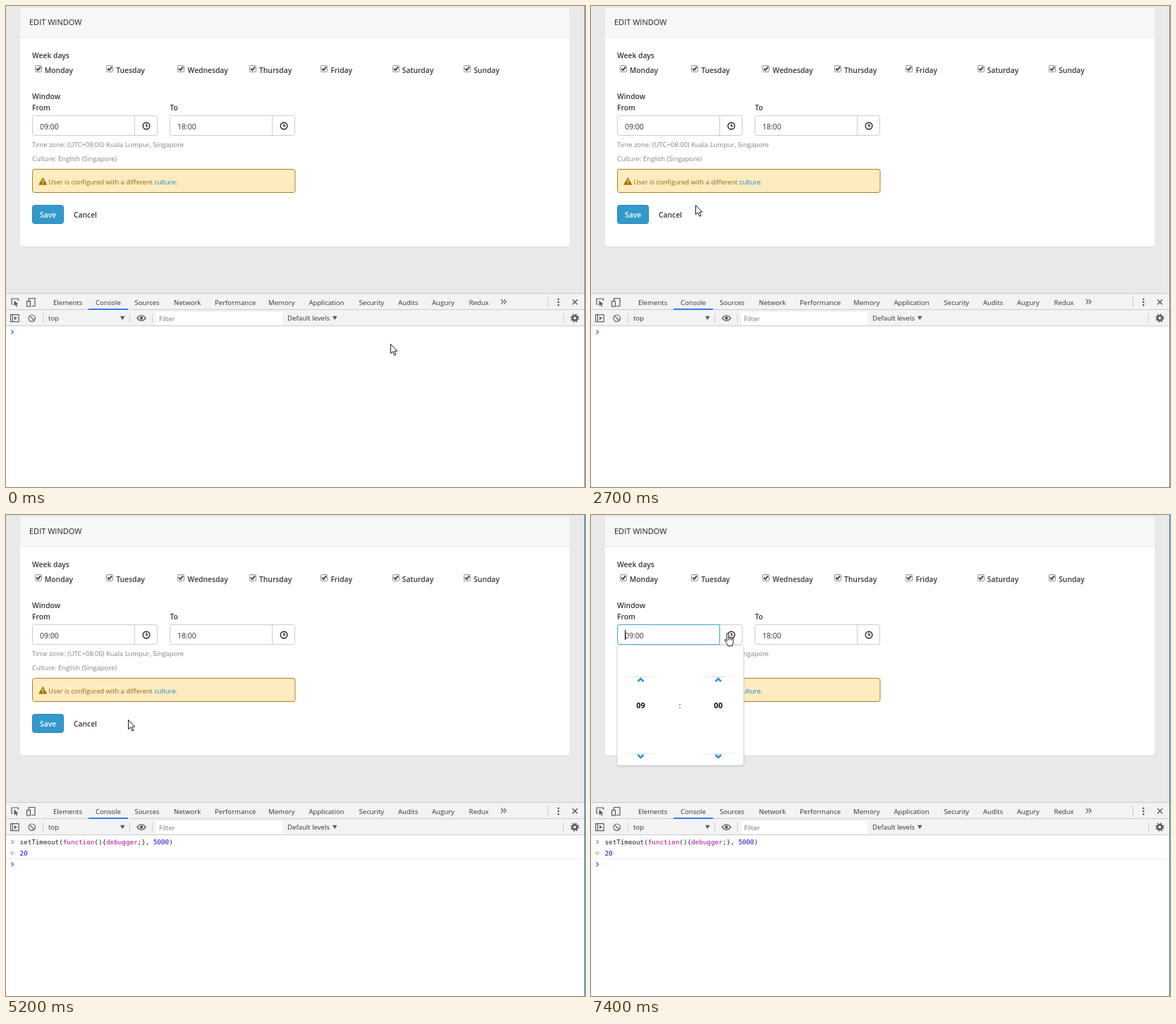
Write an HTML page that moves like this. It is 821 by 682 pixels and loops after 8 s.

```html
<!DOCTYPE html>
<html lang="en">
<head>
<meta charset="utf-8">
<title>Edit window</title>
<style>
  html, body { margin: 0; width: 100%; height: 100%; overflow: hidden; background: #fff; }
  svg { display: block; width: 100vw; height: 100vh; }
  text { font: 9.6px "Open Sans", "Noto Sans", sans-serif; fill: #333; white-space: pre; }
  .head { font-size: 11px; fill: #222; }
  .label { font-size: 10.3px; font-weight: 600; fill: #363636; }
  .value { font-size: 10.5px; }
  .hint { font-size: 9.4px; fill: #7c848b; }
  .warn { font-size: 9.35px; fill: #93690c; }
  .link { fill: #1f87c0; }
  .digits { font-size: 10.9px; font-weight: 700; fill: #111; text-anchor: middle; }
  .code, .code tspan { font: 9.25px "DejaVu Sans Mono", "Noto Sans Mono", monospace; fill: #222; }
  .code .key { fill: #aa0d91; }
  .code .num, .num.code { fill: #1c00cf; }
  .line { fill: none; stroke: #5a5a5a; stroke-width: 1.2; }
  .field { fill: #fff; stroke: #ccc; }
  .sep { stroke: #ccc; }
  .cursor { fill: #fff; stroke: #000; stroke-width: .9; stroke-linejoin: round; }
</style>
</head>
<body>
<svg viewBox="0 0 821 682" xmlns="http://www.w3.org/2000/svg">
  <defs>
    <filter id="soft" x="-10%" y="-10%" width="120%" height="125%">
      <feDropShadow dx="0" dy="1" stdDeviation="1" flood-opacity=".18"/>
    </filter>
    <linearGradient id="fade">
      <stop stop-color="#ddd" stop-opacity=".2"/>
      <stop offset=".5" stop-color="#d4d4d4"/>
      <stop offset="1" stop-color="#ddd" stop-opacity=".2"/>
    </linearGradient>
    <g id="clock" fill="none" stroke="#222" stroke-width="1.4">
      <circle r="4.8"/><path d="M0-3V.4H2.4"/>
    </g>
    <g id="tick">
      <rect x=".5" y=".5" width="9" height="9" rx="1" fill="#f1f1f1" stroke="#949494"/>
      <path d="M2.2 4.9L4.2 7L8 2.4" fill="none" stroke="#333" stroke-width="1.7"/>
    </g>
    <path id="prompt" d="M0 0L3 2.7L0 5.4" fill="none" stroke-width="1.4"/>
  </defs>

  <rect width="821" height="407" fill="#e9e9e9"/>
  <rect x="20" y="4" width="779" height="338" rx="3.5" fill="#d9d9d9"/>
  <rect x="20" y="3" width="779" height="338" rx="3.5" fill="#fff"/>
  <path d="M20 44V6.5a3.5 3.5 0 0 1 3.5-3.5H795.5a3.5 3.5 0 0 1 3.5 3.5V44z" fill="#f7f7f7"/>
  <path d="M20 44.5H799" stroke="#e6e6e6"/>
  <text class="head" x="33" y="27">EDIT WINDOW</text>
  <text class="label" x="37" y="73.5">Week days</text>
  <g id="days"></g>
  <text class="label" x="37" y="132">Window</text>
  <text class="label" x="37" y="147.5">From</text>
  <text class="label" x="232.5" y="147.5">To</text>
  <g id="fields"></g>
  <text class="hint" x="37" y="200">Time zone: (UTC+08:00) Kuala Lumpur, Singapore</text>
  <text class="hint" x="37" y="219.5">Culture: English (Singapore)</text>
  <rect x="37.5" y="231.5" width="372.500" height="33" rx="3" fill="#feebc0" stroke="#a88022"/>
  <path d="M52.2 244L57.3 253H47.1z" fill="#a57400" stroke="#a57400" stroke-width="1.3" stroke-linejoin="round"/>
  <path d="M52.2 246.4V250M52.2 251.2V252.6" stroke="#feebc0" stroke-width="1.4"/>
  <text class="warn" x="60.3" y="252.5">User is configured with a different <tspan class="link">culture.</tspan></text>
  <rect x="37.5" y="282.5" width="44" height="26" rx="3" fill="#3299cb" stroke="#2a86b4"/>
  <text class="label" x="48" y="299.5" style="fill:#fff">Save</text>
  <text class="label" x="96" y="299.5">Cancel</text>

  <g id="popup">
    <rect x="37" y="185" width="179.5" height="170" rx="3" fill="#fff" stroke="#d2d2d2" stroke-width=".7" filter="url(#soft)"/>
    <path d="M44.5 185.5L50 181.5L55.5 185.5z" fill="#fff"/>
    <g id="spinners"></g>
    <text class="digits" x="126" y="273.5" style="font-weight:400">:</text>
  </g>
  <path id="focus" d="M182.5 155.5H40.5a3 3 0 0 0-3 3V180.5a3 3 0 0 0 3 3H182.5z" fill="none" stroke="#3fa3d6"/>
  <path id="fieldCaret" d="M48.5 163V177" stroke="#000"/>

  <rect y="407" width="821" height="47" fill="#f3f3f3"/>
  <rect y="454" width="821" height="228" fill="#fff"/>
  <path class="sep" d="M0 407.5H821M0 430.5H821M0 453.5H821M768.5 412V427M52.5 436V449M175.5 436V449M207.5 436V449M790.5 436V449"/>
  <path d="M117 430H173" stroke="#3b78e7" stroke-width="2"/>
  <g id="tabs"></g>
  <g class="line">
    <path d="M10 423H8V415H17.5V418"/>
    <path d="M11.5 417.5V425.5L13.5 423.5L15 426.5L16.3 426L15 423H17.5z" fill="#5a5a5a" stroke="none"/>
    <path d="M32.5 418V414.5H41V425.5H36"/><rect x="29.5" y="418.5" width="5" height="7.5"/>
    <path d="M702 416L705 419.3L702 422.6M706 416L709 419.3L706 422.6"/>
    <path d="M803.2 416.2L810.2 423.2M810.2 416.2L803.2 423.2" stroke-width="1.5"/>
    <rect x="6.6" y="437.6" width="11.5" height="10"/><path d="M9.5 438V447.5"/>
    <path d="M12 440L15.8 442.6L12 445.2z" fill="#5a5a5a" stroke="none"/>
    <circle cx="36.7" cy="442.7" r="4.7"/><path d="M33.4 439.4L40 446"/>
    <path d="M185.8 442.5Q192 435 198.2 442.5Q192 450 185.8 442.5z"/><circle cx="192" cy="442.5" r="1.7" fill="#5a5a5a"/>
    <circle cx="806.5" cy="442.5" r="3.2" stroke-width="2.6"/>
    <circle cx="806.5" cy="442.5" r="5.2" stroke-width="1.8" stroke-dasharray="2.05"/>
  </g>
  <g fill="#5a5a5a">
    <circle cx="783.3" cy="415.7" r="1.3"/><circle cx="783.3" cy="419.9" r="1.3"/><circle cx="783.3" cy="424.1" r="1.3"/>
    <path d="M162 439.7H168.5L165.2 445.2zM463 439.7H469.5L466.2 445.2z"/>
  </g>
  <rect x="213" y="434" width="179" height="18" fill="#fff"/>
  <text x="60" y="446">top</text>
  <text x="217" y="446.5" style="fill:#777">Filter</text>
  <text x="399" y="446">Default levels</text>

  <g id="firstPrompt"><use href="#prompt" x="7.5" y="459.8" stroke="#3577e8"/></g>
  <g id="command">
    <text class="code" x="19.5" y="466">setTimeout(<tspan class="key">function</tspan>(){<tspan class="key">debugger</tspan>;}, <tspan class="num">5000</tspan>)</text>
  </g>
  <path id="brackets" d="M75.5 468.5H80.5M231.5 468.5H236.5" stroke="#888"/>
  <g id="result">
    <use href="#prompt" x="7.5" y="460.8" stroke="#999"/>
    <path d="M10 476.8L7 479.5L10 482.2" fill="none" stroke="#aaa" stroke-width="1.2"/>
    <circle cx="11.5" cy="479.5" r=".9" fill="#aaa"/>
    <text class="code num" x="19.5" y="483">20</text>
    <path d="M0 487.5H820" stroke="#eee"/>
    <use href="#prompt" x="7.5" y="492.6" stroke="#3577e8"/>
  </g>
  <path id="typeCaret" d="M19.5 0V12" stroke="#000"/>
  <path id="edge" d="M820.5 0V682" stroke="#888"/>

  <g id="arrow" class="cursor">
    <path d="M.5 .5V13.7L3.5 10.9L5.8 16.2L7.9 15.3L5.7 10.2H9.7z"/>
  </g>
  <g id="beam" fill="none" stroke="#222">
    <path d="M-3-6.5H-1Q0-6.5 0-5.5V5.5Q0 6.5-1 6.5H-3M3-6.5H1Q0-6.5 0-5.5M0 5.5Q0 6.5 1 6.5H3"/>
  </g>
  <g id="hand" class="cursor">
    <path d="M3.7 12V2Q3.7 .5 5 .5T6.3 2V7Q6.3 5.9 7.5 5.9T8.7 7.2Q8.7 6.4 9.8 6.4T10.9 7.7Q10.9 7.1 11.9 7.1T12.8 8.5V13Q12.8 15 11.3 16.6V18.7H4.9V16.9Q2.8 14.5 1 11.5Q.2 10.2 1.1 9.6T2.8 10.3z"/>
    <path d="M6.3 7V10.5M8.7 7.2V10.5M10.9 7.7V10.5" fill="none"/>
  </g>
</svg>
<script>
const $ = id => document.getElementById(id);
const fill = (id, items, draw) => { $(id).innerHTML = items.map(draw).join(''); };

fill('days', ['Monday', 'Tuesday', 'Wednesday', 'Thursday', 'Friday', 'Saturday', 'Sunday'], (day, i) => {
  const x = 40.5 + i * 101.4;
  return `<use href="#tick" x="${Math.round(x)}" y="84"/><text class="label" x="${x + 14.3}" y="94.5">${day}</text>`;
});

fill('fields', [[37.5, '09:00'], [232.5, '18:00']], ([x, time]) => `
  <rect class="field" x="${x}" y="155.5" width="177" height="28" rx="3"/>
  <path class="sep" d="M${x + 145} 156V183"/>
  <text class="value" x="${x + 10.5}" y="174.5">${time}</text>
  <use href="#clock" x="${x + 161.5}" y="170"/>`);

fill('spinners', [[70.5, '09'], [180.5, '00']], ([x, value]) => `
  <rect x="${x - 24}" y="229" width="48" height="1" fill="url(#fade)"/>
  <rect x="${x - 24}" y="338" width="48" height="1" fill="url(#fade)"/>
  <path d="M${x - 4} 236l4-4l4 4M${x - 4} 340l4 4l4-4" fill="none" stroke="#2796cf" stroke-width="2.6"/>
  <text class="digits" x="${x}" y="274">${value}</text>`);

fill('tabs', [[67, 'Elements'], [127, 'Console'], [182.5, 'Sources'], [238, 'Network'], [296, 'Performance'],
  [372, 'Memory'], [429.5, 'Application'], [500.5, 'Security'], [556, 'Audits'], [604, 'Augury'], [656.5, 'Redux']],
  ([x, name]) => `<text x="${x}" y="423.5">${name}</text>`);

// Pointer stops: start time, shape, x, y.
const pointer = [
  [0, 'arrow', 545, 479], [100, 'arrow', 525, 452], [200, 'arrow', 455, 385], [300, 'arrow', 350, 315],
  [400, 'arrow', 235, 260], [500, 'arrow', 160, 228], [600, 'arrow', 135, 205], [700, 'hand', 184, 172],
  [800, 'arrow', 222, 148], [900, 'beam', 240.5, 161.5], [1000, 'beam', 234.5, 161.5], [1300, 'beam', 234.5, 163.5],
  [1400, 'arrow', 217, 176], [1500, 'arrow', 183, 186], [1700, 'hand', 187, 180], [1800, 'hand', 189, 176],
  [2700, 'arrow', 148, 282], [2800, 'arrow', 137, 350], [2900, 'arrow', 126, 412], [3000, 'arrow', 118, 458],
  [3100, 'arrow', 112, 493], [3200, 'arrow', 108, 515], [3300, 'arrow', 105, 529], [3400, 'arrow', 104, 533],
  [3900, 'arrow', 106, 531], [4000, 'arrow', 111, 525], [4100, 'arrow', 117, 516], [4200, 'arrow', 121, 511],
  [5000, 'arrow', 130, 475], [5100, 'arrow', 155, 385], [5200, 'arrow', 173, 290], [5300, 'arrow', 183, 238],
  [5400, 'arrow', 186, 200], [5500, 'hand', 186, 172], [5600, 'hand', 187, 163], [5900, 'hand', 188, 165],
  [6000, 'hand', 189, 167]
];

// Time spans in which each part shows.
const spans = {
  firstPrompt: [[0, 4700]],
  command: [[3600, 8000]],
  brackets: [[3600, 4700]],
  result: [[4700, 8000]],
  typeCaret: [[3500, 4200], [4700, 5200], [5800, 6300]],
  focus: [[6400, 8000]],
  popup: [[6500, 8000]],
  fieldCaret: [[6400, 6900], [7400, 8000]]
};

const show = (id, on) => { $(id).style.display = on ? '' : 'none'; };

function draw() {
  const t = performance.now() % 8000;
  for (const id in spans) show(id, spans[id].some(([from, to]) => t >= from && t < to));

  const [, shape, x, y] = pointer.findLast(stop => stop[0] <= t);
  for (const id of ['arrow', 'beam', 'hand']) show(id, id === shape);
  $(shape).setAttribute('transform', `translate(${x} ${y})`);

  const caret = t < 3600 ? [0, 457] : t < 4700 ? [217, 457] : [0, 489];
  $('typeCaret').setAttribute('transform', `translate(${caret})`);
  $('command').setAttribute('transform', `translate(0 ${t < 4700 ? 0 : 1})`);
  $('edge').setAttribute('stroke', t < 3400 ? '#888' : '#1a8ad0');
  requestAnimationFrame(draw);
}
draw();
</script>
</body>
</html>
```
